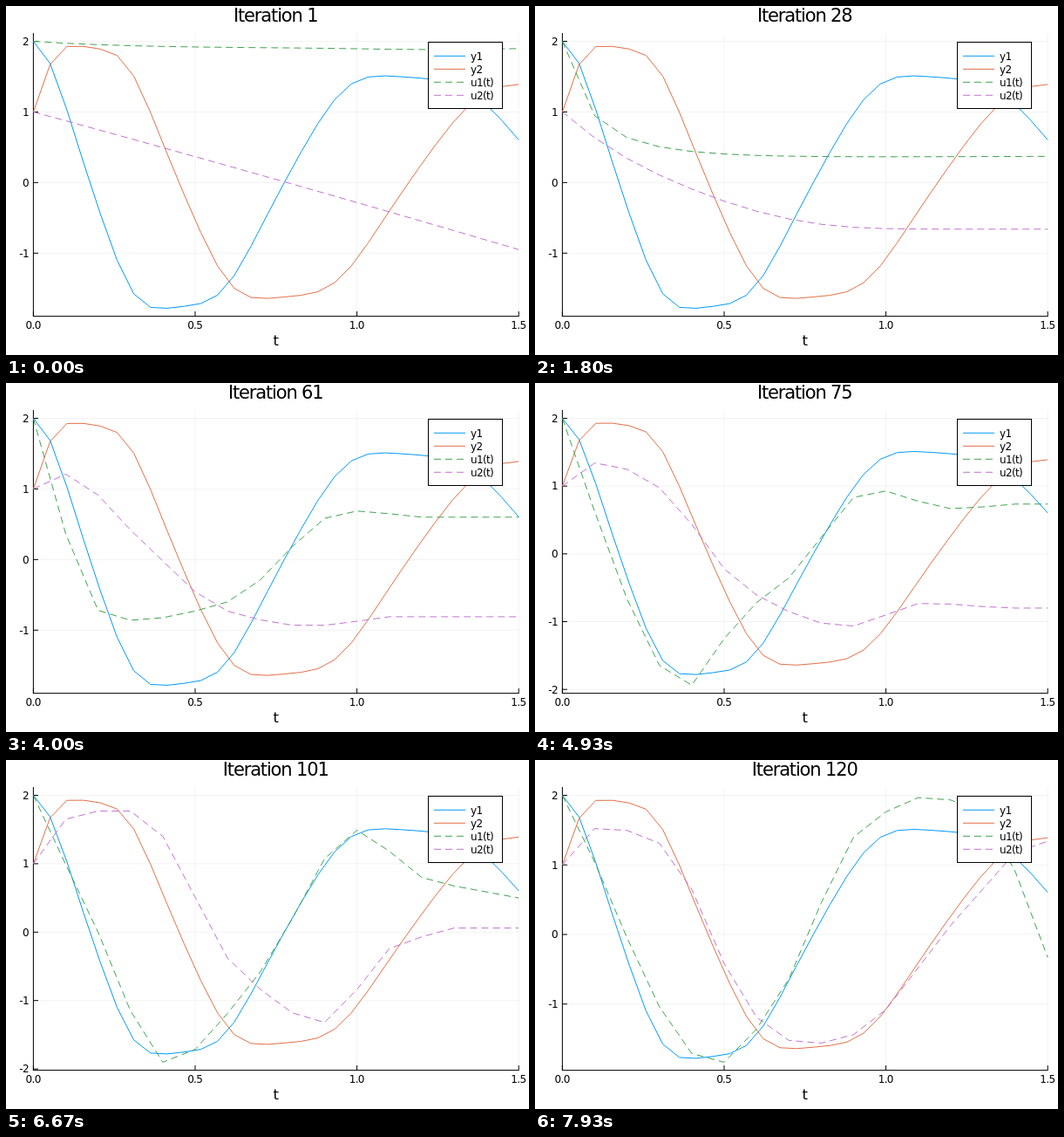
An HTML page for the animation above (8000 ms loop, 600 by 400 pixels).

```html
<!DOCTYPE html>
<html lang="en">
<head>
<meta charset="utf-8">
<title>Training iterations</title>
<style>
  html, body { margin: 0; width: 100%; height: 100%; overflow: hidden; background: #fff; }
  svg { display: block; width: 600px; height: 400px; }
  text { font: 12px "DejaVu Sans", sans-serif; letter-spacing: -.055em; fill: #000; }
  .title { font-size: 21px; }
  .guide { font-size: 16.5px; }
  .mid { text-anchor: middle; }
  .end { text-anchor: end; }
  .axis { stroke: #000; fill: none; }
  .grid { stroke: #000; stroke-opacity: .1; stroke-width: .5; }
  .line { fill: none; stroke-linejoin: round; }
  .dash { stroke-dasharray: 8 5; }
</style>
</head>
<body>
<svg viewBox="0 0 600 400">
  <g id="yGrid"></g>
  <g id="xGrid"></g>
  <path class="axis" d="M31 355.6H588.5M31.4 31V356"/>
  <g id="curves"></g>
  <g id="legend"><rect class="axis" style="fill:#fff" x="484.5" y="41.5" width="85" height="76"/></g>
  <text id="title" class="title mid" x="309.2" y="18"></text>
  <text class="guide mid" x="309.2" y="389">t</text>
</svg>
<script>
const LOOP = 8000, TOP = 31.3, BOTTOM = 355.6, PAD = 0.03;
const $ = id => document.getElementById(id);
const px = t => 31.4 + 371.2 * t;
const mix = (a, b, p) => a + (b - a) * p;
const bell = (t, mid, width) => Math.exp(-(((t - mid) / width) ** 2));

function add(parent, tag, attrs, text = '') {
  const el = document.createElementNS('http://www.w3.org/2000/svg', tag);
  for (const k in attrs) el.setAttribute(k, attrs[k]);
  el.textContent = text;
  return parent.appendChild(el);
}

// Cubic spiral, integrated with RK4 and sampled at 30 times.
function spiral() {
  const rate = ([a, b]) => [-0.1 * a ** 3 - 2 * b ** 3, 2 * a ** 3 - 0.1 * b ** 3];
  const step = (s, k, h) => [s[0] + k[0] * h, s[1] + k[1] * h];
  const sub = 40, h = 1.5 / 29 / sub, out = [[2, 1]];
  let s = out[0];
  for (let n = 1; n <= 29 * sub; n++) {
    const k1 = rate(s), k2 = rate(step(s, k1, h / 2));
    const k3 = rate(step(s, k2, h / 2)), k4 = rate(step(s, k3, h));
    s = s.map((v, i) => v + h / 6 * (k1[i] + 2 * k2[i] + 2 * k3[i] + k4[i]));
    if (n % sub === 0) out.push(s);
  }
  return [0, 1].map(i => out.map(p => p[i]));
}

// Monotone cubic through a curve's bends, flat after the last one.
function bends(...points) {
  const chord = i => (points[i + 1][1] - points[i][1]) / (points[i + 1][0] - points[i][0]);
  const last = points.length - 1;
  const slope = points.map((_, i) => {
    if (i === 0 || i === last) return chord(i && last - 1);
    const a = chord(i - 1), b = chord(i);
    return a * b > 0 ? 2 * a * b / (a + b) : 0;
  });
  return t => {
    const i = points.findIndex(p => p[0] > t + 1e-9) - 1;
    if (i < 0) return points[last][1];
    const [t0, v0] = points[i], [t1, v1] = points[i + 1], w = t1 - t0, s = (t - t0) / w;
    return mix(v0, v1, s * s * (3 - 2 * s)) +
      w * s * (1 - s) * (slope[i] * (1 - s) - slope[i + 1] * s);
  };
}
const u1 = (...points) => bends([0, 2], ...points);
const u2 = (...points) => bends([0, 1], ...points);

// Predicted curves at turning iterations; ease shapes the way to the next one.
const linear = p => p;
const poses = [
  { n: 1, ease: p => 1 - (1 - p) ** 3, curves: [
    t => 1.9 + 0.1 * Math.exp(-3.2 * t) - 0.018 * bell(t, 1.2, 0.25),
    t => 1 - 1.25 * t - 0.033 * t * t] },
  { n: 28, ease: p => p * p, curves: [
    t => 0.345 + 0.865 * Math.exp(-18 * t) + 0.79 * Math.exp(-5.5 * t) + 0.017 * t,
    t => -0.66 + 1.66 * Math.exp(-2.5 * t - 2.9 * t ** 4)] },
  // u1 swings below its path for a while after this one.
  { n: 61, ease: linear, dip: 0.85, curves: [
    u1([.2, -.72], [.3, -.86], [.6, -.6], [.97, .69], [1.2, .6]),
    u2([.1, 1.21], [.3, .42], [.6, -.73], [.85, -.94], [1.1, -.81])] },
  { n: 88, ease: linear, curves: [
    u1([.37, -1.42], [.5, -.95], [.7, -.4], [.95, 1.2], [1.2, .73], [1.4, .86]),
    u2([.15, 1.57], [.3, 1.49], [.5, 0], [.7, -.85], [.88, -1.2], [1.12, -.65], [1.36, -.79])] },
  { n: 101, ease: linear, curves: [
    u1([.2, 0], [.41, -1.91], [.7, -.59], [1, 1.49], [1.2, .8], [1.5, .5]),
    u2([.1, 1.65], [.27, 1.8], [.4, 1.4], [.6, -.38], [.9, -1.32], [1.1, -.24], [1.3, .06])] },
  { n: 120, curves: [
    u1([.47, -1.87], [.7, -.64], [.9, 1.4], [1.13, 1.98], [1.3, 1.74], [1.5, -.33]),
    u2([.12, 1.55], [.3, 1.31], [.6, -1.19], [.75, -1.58], [.9, -1.44], [1.2, .13], [1.43, 1.34])] }
];

const times = Array.from({ length: 16 }, (_, i) => i / 10);

function predict(n) {
  const i = Math.max(0, poses.findIndex(pose => pose.n >= n) - 1);
  const a = poses[i], b = poses[i + 1];
  const p = (n - a.n) / (b.n - a.n);
  const dip = (a.dip || 0) * Math.sin(Math.PI * p) ** 2;
  const blend = k => times.map(t => mix(a.curves[k](t), b.curves[k](t), a.ease(p)));
  return [blend(0).map((v, k) => v - dip * bell(times[k], 0.38, 0.14)), blend(1)];
}

const truth = spiral();
const series = [
  ['y1', '#009afa', ''], ['y2', '#e36f47', ''],
  ['u1(t)', '#3ea44e', ' dash'], ['u2(t)', '#c371d2', ' dash']
];
const curves = series.map(([name, stroke, dash], i) => {
  const y = 57.3 + 15 * i, look = { class: 'line' + dash, stroke };
  add($('legend'), 'path', { ...look, d: `M491 ${y}H527` });
  add($('legend'), 'text', { x: 533, y: y + 4.2 }, name);
  return add($('curves'), 'path', look);
});

for (const t of [0, 0.5, 1, 1.5]) {
  const x = px(t);
  add($('xGrid'), 'path', { class: 'grid', d: `M${x} ${TOP}V${BOTTOM}` });
  add($('xGrid'), 'path', { class: 'axis', d: `M${x} ${BOTTOM}V350` });
  add($('xGrid'), 'text', { class: 'mid', x: x - 0.3, y: 369.5 }, t.toFixed(1));
}
const yTicks = [-2, -1, 0, 1, 2].map(value => {
  const g = add($('yGrid'), 'g', {});
  add(g, 'path', { class: 'grid', d: 'M31 0H588' });
  add(g, 'path', { class: 'axis', d: 'M31 0H37' });
  add(g, 'text', { class: 'end', x: 26, y: 4.3 }, value);
  return { value, g };
});

function draw(n) {
  const lists = [...truth, ...predict(n)], all = lists.flat();
  const max = Math.max(...all), min = Math.min(...all), room = PAD * (max - min);
  const hi = max + room, lo = min - room;
  const py = v => TOP + (hi - v) / (hi - lo) * (BOTTOM - TOP);
  lists.forEach((list, i) => {
    const dt = 1.5 / (list.length - 1);
    curves[i].setAttribute('d', 'M' + list.map((v, k) => `${px(k * dt).toFixed(2)} ${py(v).toFixed(2)}`).join('L'));
  });
  for (const { value, g } of yTicks) {
    g.setAttribute('transform', `translate(0 ${py(value).toFixed(2)})`);
    g.setAttribute('visibility', value >= lo && value <= hi ? 'visible' : 'hidden');
  }
  $('title').textContent = 'Iteration ' + n;
}

// Three iterations every 200 ms, held for 70, 60 and 70 ms.
function iterationAt(ms) {
  const r = ms % 200;
  return 1 + 3 * Math.floor(ms / 200) + (r >= 70) + (r >= 130);
}

let shown = 0;
function tick() {
  const n = iterationAt(performance.now() % LOOP);
  if (n !== shown) draw(shown = n);
  requestAnimationFrame(tick);
}
tick();
</script>
</body>
</html>
```
